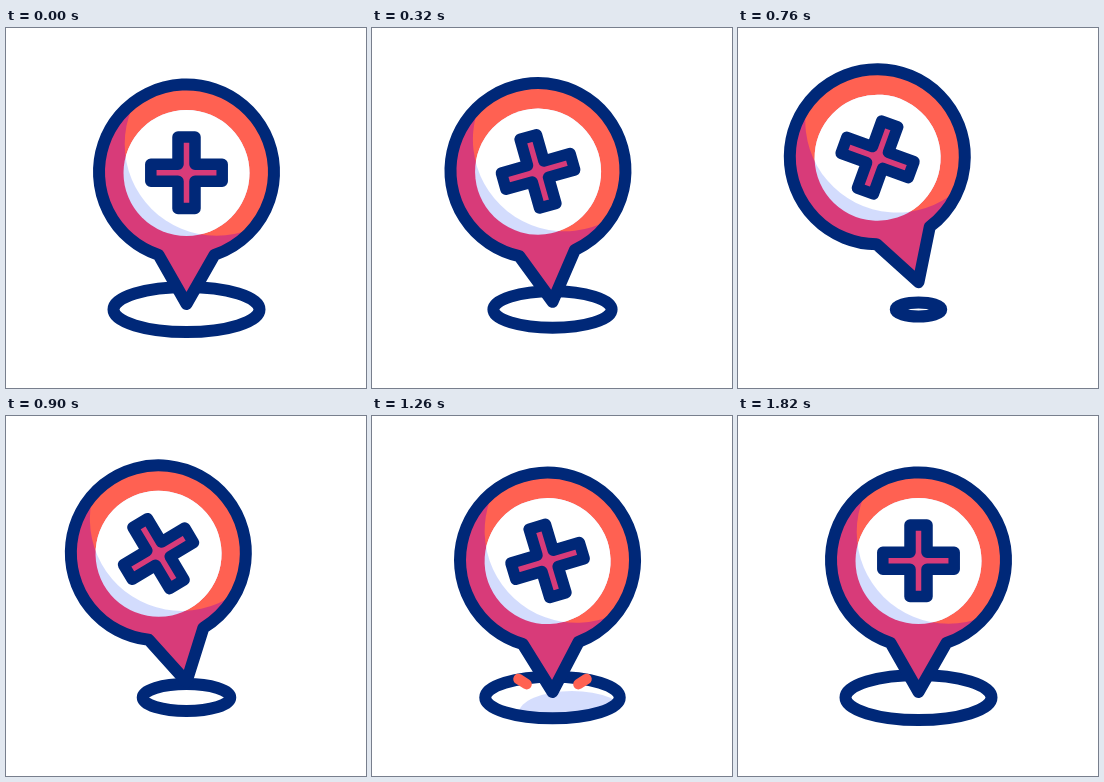
An HTML page with a canvas that plays this animation: 360x360 px, repeating every 3000 ms.

```html
<!DOCTYPE html>
<html lang="en">
<head>
<meta charset="utf-8">
<title>Medical location pin</title>
<style>
html, body { margin: 0; width: 100%; height: 100%; overflow: hidden; background: #fff; }
canvas { display: block; width: 360px; height: 360px; }
</style>
</head>
<body>
<canvas id="stage"></canvas>
<script>
const canvas = document.getElementById('stage');
const ctx = canvas.getContext('2d');
const ratio = window.devicePixelRatio || 1;
canvas.width = canvas.height = Math.round(360 * ratio);

const LOOP = 3000, STEP = 20, TAU = Math.PI * 2;
const NAVY = '#002878', ORANGE = '#ff6152', PINK = '#d83b79', LILAC = '#d3dcfd';
const TIP = { x: 180.5, y: 276 };

// Keys are [time, value] pairs, joined by sine easing.
const tiltKeys = [[0, 0], [800, -18.3], [1090, 4.2], [1330, -3.7], [1640, 0.4], [1820, 0]];
const liftKeys = [[200, 0], [790, 22], [1000, 0]];
const spinKeys = [[140, 0], [780, -52], [1040, 24], [1275, -15], [1510, 6], [1760, 0]];
const ringKeys = [[70, 1], [780, 0.31], [1070, 1.1], [1295, 0.91], [1510, 1.005], [1700, 1]];
const shadeKeys = [[930, 0], [1010, 1], [1270, 0.95], [1440, 0]];
const sparkKeys = [[965, 0], [1010, 11.8], [1260, 10.5], [1350, 0]];

const lerp = (a, b, u) => a + (b - a) * u;
const clamp = u => Math.min(1, Math.max(0, u));
const span = (t, a, b) => clamp((t - a) / (b - a));
const rad = deg => deg * Math.PI / 180;

function track(keys, t) {
  if (t <= keys[0][0]) return keys[0][1];
  for (let i = 1; i < keys.length; i++) {
    const [a, from] = keys[i - 1], [b, to] = keys[i];
    if (t < b) return lerp(from, to, (1 - Math.cos(Math.PI * (t - a) / (b - a))) / 2);
  }
  return keys[keys.length - 1][1];
}

function oval(x, y, rx, ry = rx) {
  const p = new Path2D();
  p.ellipse(x, y, rx, ry, 0, 0, TAU);
  return p;
}

function fill(path, color) {
  ctx.fillStyle = color;
  ctx.fill(path);
}

function stroke(path, width, color = NAVY) {
  ctx.lineWidth = width;
  ctx.strokeStyle = color;
  ctx.stroke(path);
}

function inside(path, draw) {
  ctx.save();
  ctx.clip(path);
  draw();
  ctx.restore();
}

// Pin shapes are relative to the tip.
const bodyPath = (() => {
  const p = new Path2D();
  const half = Math.asin(28 / 87.5);
  p.arc(0, -132, 87.5, Math.PI / 2 + half, Math.PI / 2 - half + TAU);
  p.lineTo(0, 0);
  p.closePath();
  return p;
})();
const facePath = oval(0, -131, 63);
const lightPath = oval(30, -160, 91.8);

const crossPath = (() => {
  const p = new Path2D(), w = 8.5, l = 35.7;
  const corners = [[-w, -l], [w, -l], [w, -w]];
  for (let q = 0; q < 4; q++) {
    const c = Math.round(Math.cos(q * Math.PI / 2)), s = Math.round(Math.sin(q * Math.PI / 2));
    corners.forEach(([x, y]) => p.lineTo(x * c - y * s, x * s + y * c));
  }
  p.closePath();
  return p;
})();

function drawRing(t) {
  const size = track(ringKeys, t);
  const ring = oval(TIP.x, 281.5, 73 * size, 22.5 * size);
  const u = span(t, 1020, 1260);
  inside(ring, () => {
    ctx.globalAlpha = track(shadeKeys, t);
    fill(oval(lerp(215, 200, u), lerp(290, 297, u), lerp(77, 53, u), lerp(28, 22, u)), LILAC);
  });
  stroke(ring, 12);
}

function drawSparks(t) {
  const width = track(sparkKeys, t);
  if (width <= 0) return;
  const head = span(t, 1005, 1230), tail = span(t, 1010, 1500);
  for (const side of [-1, 1]) {
    const p = new Path2D();
    const at = u => [TIP.x + side * lerp(17.5, 34, u), lerp(273.5, 263, u)];
    p.moveTo(...at(tail));
    p.lineTo(...at(head + 0.001));
    stroke(p, width, ORANGE);
  }
}

function drawPin(t) {
  ctx.save();
  ctx.translate(TIP.x, TIP.y - track(liftKeys, t));
  ctx.rotate(rad(track(tiltKeys, t)));
  fill(bodyPath, PINK);
  inside(bodyPath, () => fill(lightPath, ORANGE));
  fill(facePath, LILAC);
  inside(facePath, () => fill(lightPath, '#fff'));
  stroke(bodyPath, 12);

  ctx.translate(0, -131.2);
  ctx.rotate(rad(track(spinKeys, t)));
  fill(crossPath, PINK);
  stroke(crossPath, 11.5);
  ctx.restore();
}

function draw(now) {
  const t = Math.floor((now % LOOP) / STEP) * STEP;
  ctx.setTransform(ratio, 0, 0, ratio, 0, 0);
  ctx.lineCap = ctx.lineJoin = 'round';
  ctx.fillStyle = '#fff';
  ctx.fillRect(0, 0, 360, 360);
  drawRing(t);
  drawSparks(t);
  drawPin(t);
}

let start = null;
function tick(now) {
  if (start === null) start = now;
  draw(now - start);
  requestAnimationFrame(tick);
}
draw(0);
requestAnimationFrame(tick);
</script>
</body>
</html>
```
